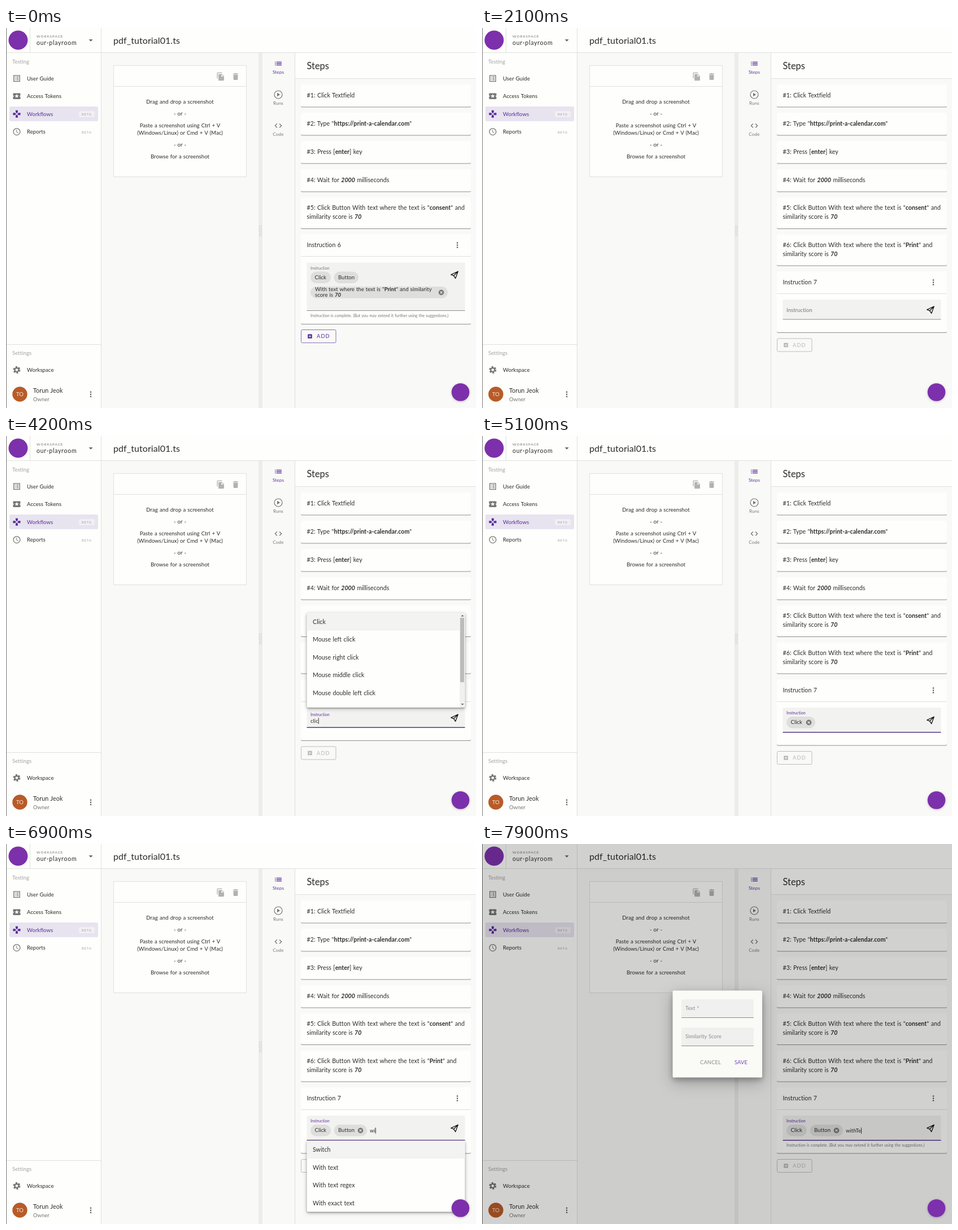
These frames come from a looping animation (832x673 px, 8 s). An HTML page:

```html
<!DOCTYPE html>
<html lang="en">
<head>
<meta charset="utf-8">
<title>Workflow steps</title>
<style>
  html, body { margin: 0; width: 832px; height: 673px; overflow: hidden; background: #f9f9f7; }
  svg { display: block; }
  text { font-family: Lato, "Open Sans", sans-serif; letter-spacing: .005em; word-spacing: .06em; }
  .b { font-weight: 700; }
  .bi { font-weight: 700; font-style: italic; }
  .card { fill: #fefefc; filter: drop-shadow(0 1px .6px rgba(0,0,0,.42)); }
  .popup { fill: #fefefc; filter: drop-shadow(0 1px .8px rgba(0,0,0,.35)) drop-shadow(0 2px 3px rgba(0,0,0,.25)); }
  .dialog { fill: #fafaf7; filter: drop-shadow(0 4px 5px rgba(0,0,0,.25)) drop-shadow(0 8px 13px rgba(0,0,0,.25)); }
</style>
</head>
<body>
<svg id="stage" width="832" height="673" viewBox="0 0 832 673"></svg>
<script>
const LOOP = 8000, INK = '#2b2b2b', GREY = '#757573', FAINT = '#a3a3a1', LINE = '#e0e0de',
  PURPLE = '#5b2d9c', BRAND = '#7c30ab', WHITE = '#fefefc', FIELD = '#f2f2f0';
const stage = document.getElementById('stage');

const text = (x, y, s, size = 10.6, fill = INK, attrs = '') =>
  `<text x="${x}" y="${y}" font-size="${size}" fill="${fill}" ${attrs}>${s}</text>`;
const spaced = n => `style="letter-spacing:${n}px"`;
const rect = (x, y, w, h, fill, attrs = '') =>
  `<rect x="${x}" y="${y}" width="${w}" height="${h}" fill="${fill}" ${attrs}/>`;
const box = (cls, x, y, w, h) => `<rect class="${cls}" x="${x}" y="${y}" width="${w}" height="${h}" rx="2"/>`;
const card = (y, h) => box('card', 522, y, 301, h - .6);
const circle = (x, y, r, fill, attrs = '') => `<circle cx="${x}" cy="${y}" r="${r}" fill="${fill}" ${attrs}/>`;
const stroke = (d, color, width = 1) => `<path d="${d}" fill="none" stroke="${color}" stroke-width="${width}"/>`;
const at = (x, y, body) => `<g transform="translate(${x} ${y})">${body}</g>`;
const bold = s => `<tspan class="b">${s}</tspan>`;
const strong = s => `<tspan class="bi">${s}</tspan>`;

// 24-unit icon centred on (x, y)
const icon = (d, x, y, fill, k = .656) =>
  `<path transform="translate(${x} ${y}) scale(${k}) translate(-12 -12)" d="${d}" fill="${fill}" fill-rule="evenodd"/>`;
const ICONS = {
  guide: 'M3 3h18v18H3zM5 5v14h14V5zM11 7h6v2h-6zm0 4h6v2h-6zm0 4h6v2h-6zM7 7h2v2H7zm0 4h2v2H7zm0 4h2v2H7z',
  ticket: 'M2 6q0-2 2-2h16q2 0 2 2v4a2 2 0 0 0 0 4v4q0 2-2 2H4q-2 0-2-2v-4a2 2 0 0 0 0-4zM12 5.8l-1.5 4-4.3.2 3.3 2.7-1.1 4.1 3.6-2.3 3.6 2.3-1.1-4.1 3.3-2.7-4.3-.2z',
  pads: 'M15 7.5V2H9v5.5l3 3zM7.5 9H2v6h5.5l3-3zM9 16.5V22h6v-5.5l-3-3zM16.5 9l-3 3 3 3H22V9z',
  copy: 'M16 1H4q-2 0-2 2v14h2V3h12zM15 5l6 6v10q0 2-2 2H8q-2 0-2-2V7q0-2 2-2zM14 12h5.5L14 6.5z',
  bin: 'M6 19q0 2 2 2h8q2 0 2-2V7H6zM19 4h-3.5l-1-1h-5l-1 1H5v2h14z',
  list: 'M3 7h2v2H3zm0 4h2v2H3zm0 4h2v2H3zM7 7h14v2H7zm0 4h14v2H7zm0 4h14v2H7z',
  code: 'M9.4 16.6L4.8 12l4.6-4.6L8 6l-6 6 6 6zM14.6 16.6l4.6-4.6-4.6-4.6L16 6l6 6-6 6z',
  add: 'M5 3h14q2 0 2 2v14q0 2-2 2H5q-2 0-2-2V5q0-2 2-2zM17 13v-2h-4V7h-2v4H7v2h4v4h2v-4z'
};
const kebab = (x, y) => [-4, 0, 4].map(d => circle(x, y + d, 1.3, '#5c5c5a')).join('');
const send = y => at(794, y, `<path d="M6.2 -6L-6.3 -.2L-1.5 1.7L1.6 6.4ZL-1.5 1.7" fill="none"
  stroke="#111" stroke-width="1.3" stroke-linejoin="round"/>`);

function sidebar() {
  const beta = y => text(143, y, 'BETA', 6, FAINT, `text-anchor="middle" ${spaced(.9)}`);
  return rect(0, 0, 168, 673, WHITE) + rect(6, 139, 157, 26, '#e7e3ef', 'rx="2"') +
    rect(129, 147, 28, 11, '#f1eff4', 'rx="2"') +
    text(11, 62.5, 'Testing', 9.6, FAINT) +
    text(37, 92.7, 'User Guide', 9.6) + text(37, 124.2, 'Access Tokens', 9.6) +
    text(37, 155.7, 'Workflows', 9.6, PURPLE) + text(37, 187, 'Reports', 9.6) + beta(155) + beta(186.5) +
    icon(ICONS.guide, 19, 89.3, GREY) + icon(ICONS.ticket, 19, 120.7, GREY) +
    icon(ICONS.pads, 19, 152.2, PURPLE) +
    at(19, 183.7, circle(0, 0, 5.9, 'none', `stroke="${GREY}" stroke-width="1.3"`) +
      stroke('M-.2 -3.4V.4L2.8 2.3', GREY)) +
    stroke('M0 560.5H168', LINE) + text(11, 578.7, 'Settings', 9.6, FAINT) +
    at(19, 605.5, circle(0, 0, 3.5, 'none', `stroke="${GREY}" stroke-width="2.3"`) +
      circle(0, 0, 5.3, 'none', `stroke="${GREY}" stroke-width="2.4" stroke-dasharray="3 ${5.3 * Math.PI / 3 - 3}"`)) +
    text(37, 608.9, 'Workspace', 9.6) +
    circle(24.5, 648.5, 13.2, '#b85b28') + text(24.5, 652, 'TO', 9.6, '#f6e6da', 'text-anchor="middle"') +
    text(48, 646.3, 'Torun Jeok', 10.8) + text(48, 660.5, 'Owner', 9.4, GREY) + kebab(150, 648.7);
}

function header() {
  return rect(0, 0, 832, 43, WHITE) + stroke('M0 43.5H832M42.5 0V43M168.5 0V673', LINE) +
    rect(0, 0, 1, 673, '#777775') + circle(21.5, 21.5, 17, BRAND) +
    text(54, 16.5, 'WORKSPACE', 6.3, GREY, spaced(1)) + text(54, 29.8, 'our-playroom', 10.6, INK, spaced(.7)) +
    '<path d="M146.6 20.2h7l-3.5 3.6z" fill="#5c5c5a"/>' + text(190, 27.5, 'pdf_tutorial01.ts', 16);
}

function middle() {
  const lines = [[134, 'Drag and drop a screenshot'], [155.3, '- or -'], [175.7, 'Paste a screenshot using Ctrl + V'],
    [188.9, '(Windows/Linux) or Cmd + V (Mac)'], [210.2, '- or -'], [231, 'Browse for a screenshot']];
  const tab = (y, s, fill) => text(482, y, s, 8, fill, `text-anchor="middle" ${spaced(.2)}`);
  let grip = '';
  for (let y = 350; y < 370; y += 2.5) grip += rect(448.5, y, 1, 1, '#b5b5b3') + rect(451, y, 1, 1, '#b5b5b3');
  return rect(190.5, 66.5, 235, 197, WHITE, `stroke="${LINE}"`) + stroke('M190 103.5H425', LINE) +
    icon(ICONS.copy, 380, 86, '#b2b2b0') + icon(ICONS.bin, 406.5, 86, '#b2b2b0') +
    lines.map(([y, s]) => text(308, y, s, 9.6, INK, 'text-anchor="middle"')).join('') +
    rect(447, 44, 7, 629, '#ececea') + grip + stroke('M511.5 44V673', LINE) +
    icon(ICONS.list, 482, 63, PURPLE) + tab(81.3, 'Steps', PURPLE) +
    circle(482, 118, 7, 'none', `stroke="${GREY}" stroke-width="1.2"`) +
    `<path d="M480 114.8l5 3.2l-5 3.2z" fill="${GREY}"/>` + tab(136.3, 'Runs', GREY) +
    icon(ICONS.code, 482, 173, GREY) + tab(191.3, 'Code', GREY);
}

const target = word => `With text where the text is "${bold(word)}" and`;
const score = `score is ${strong(70)}`;
const tallCard = (y, n, word) => card(y, 55.5) +
  text(532.5, y + 22, `#${n}: Click Button ${target(word)}`) + text(532.5, y + 38, `similarity ${score}`);

function steps() {
  const single = ['Click Textfield', `Type "${bold('https://print-a-calendar.com')}"`,
    `Press [${bold('enter')}] key`, `Wait for ${strong(2000)} milliseconds`];
  return rect(512, 44, 320, 45, WHITE) + stroke('M512 89.5H832', LINE) + text(532.5, 73, 'Steps', 16.3) +
    single.map((s, i) => card(100 + 50 * i, 40) +
      text(532.5, 122.7 + 50 * i, `#${i + 1}: ${s}`)).join('') + tallCard(300, 5, 'consent');
}

const close = (x, y) => circle(x, y, 4.8, '#777775') +
  stroke(`M${x - 1.9} ${y - 1.9}l3.8 3.8m0 -3.8l-3.8 3.8`, '#e8e8e6', 1.1);
const chip = (x, y, w, s, closable) => rect(x, y, w, 20.5, '#dededc', 'rx="10.25"') +
  text(x + 7.5, y + 13.4, s, 9.5) + (closable ? close(x + w - 11.5, y + 10.4) : '');
const helper = y => text(539, y, 'Instruction is complete. (But you may extend it further using the suggestions.)', 7, GREY);

function editor(n, top, height) {
  return card(top, height) + text(532.5, top + 22.5, `Instruction ${n}`) +
    kebab(799, top + 19.5) + stroke(`M522 ${top + 39.5}H823`, LINE);
}

function addButton(y, enabled) {
  const ink = enabled ? PURPLE : '#b9b9b7';
  return rect(522.5, y, 61.5, 23, 'none', `rx="2" stroke="${enabled ? '#8a74b4' : '#bdbdbb'}"`) +
    icon(ICONS.add, 538, y + 11.5, ink, .42) + text(550, y + 14.8, 'ADD', 9.3, ink, spaced(1.1));
}

function finishedEditor() {
  return editor(6, 365, 159.5) + rect(532.5, 415.5, 280, 85, FIELD, 'rx="2"') + stroke('M532.5 500.5H812.5', '#8c8c8a') +
    text(539, 428, 'Instruction', 7, GREY) + chip(539, 431.5, 36, 'Click') + chip(580.5, 431.5, 43.5, 'Button') +
    chip(539, 458, 243, '', true) +
    text(547, 466, `${target('Print')} similarity`, 9.5) + text(547, 476.4, score, 9.5) +
    send(437) + helper(512) + addButton(534.5, true);
}

const POOLS = [
  ['Click', 'Mouse left click', 'Mouse right click', 'Mouse middle click', 'Mouse double left click'],
  ['Button'],
  ['Switch', 'With text', 'With text regex', 'With exact text']
];

function popup(chips, typed) {
  const key = typed.toLowerCase();
  const options = POOLS[chips].filter(o => o.toLowerCase().replaceAll(' ', '').includes(key));
  const top = chips ? 525.5 : 313, height = chips ? options.length * 31.5 : 168;
  return box('popup', 532.5, top, 280, height) + rect(532.5, top, 280, 31.5, '#f3f3f1') +
    options.map((o, i) => text(543, top + 19.5 + 31.5 * i, o)).join('') +
    (chips ? '' : rect(803, 313, 9.5, 168, '#f0f0ee') + rect(804, 322, 7, 114, '#bcbcba') +
      '<path d="M805.5 319.5h5l-2.5 -2.8zM805.5 474h5l-2.5 2.8z" fill="#666"/>');
}

// time, finished chips, typed text
const typing = (chips, word, times) => times.map((t, i) => [t, chips, word.slice(0, i + 1)]);
const CUES = [
  [2500, 0, ''], ...typing(0, 'click', [3600, 3800, 4000, 4100, 4300]),
  [4500, 1, ''], ...typing(1, 'butt', [5300, 5500, 5700, 5900]),
  [6200, 2, ''], ...typing(2, 'withTe', [6700, 6900, 7100, 7300, 7500, 7700])
];
const ADDED = 1400, CHOSEN = 7800, DIALOG = 7900;

function newEditor(t, cue) {
  const [since, chips, typed] = cue || [0, 0, ''];
  const grow = chips ? 8.5 : 0, bottom = 516.5 + grow;
  let out = tallCard(365.5, 6, 'Print') + editor(7, 431, 108.5 + grow) +
    rect(532.5, 481, 280, 35.5 + grow, FIELD, 'rx="2"') + send(499 + grow / 2) + addButton(550 + grow, false);
  if (!cue) return out + stroke('M532.5 516H812.5', '#8c8c8a') + text(539, 502.5, 'Instruction', 9.5, GREY);
  const x = [539, 594.5, 644][chips], y = chips ? 510.6 : 507.5;
  out += rect(532.5, bottom - 1, 280, 1.4, '#4a2880') + text(539, chips ? 493.4 : 495.5, 'Instruction', 7, PURPLE) +
    text(x, y, typed, 9.5, INK, 'id="typed"');
  if (chips) out += chip(539, 497, chips > 1 ? 36 : 51, 'Click', chips < 2);
  if (chips > 1) out += chip(580.5, 497, 58.5, 'Button', true) + helper(536);
  if ((t - since) % 1000 < 500) out += rect(x, y - 8.5, .9, 11, INK, 'id="caret"');
  if (t < CHOSEN && (typed || !chips)) out += popup(chips, typed);
  return out;
}

function dialog() {
  const field = (y, s) => rect(353, y, 128, 32.5, '#f0f0ee', 'rx="2"') +
    stroke(`M353 ${y + 32.5}H481`, '#8c8c8a') + text(360, y + 18.8, s, 9.3, '#8b8b89');
  return rect(0, 0, 832, 673, '#000', 'opacity=".175"') +
    box('dialog', 337.5, 259.5, 158.5, 154) + field(275, 'Text *') + field(325, 'Similarity Score') +
    text(386, 390, 'CANCEL', 9.5, '#8b8b89') + text(447, 390, 'SAVE', 9.5, '#7348b4');
}

const backdrop = rect(0, 0, 832, 673, '#f9f9f7') + sidebar() + header() + middle() + steps();
const chat = circle(804.5, 645, 15.8, BRAND, 'style="filter:drop-shadow(0 1px 2px rgba(0,0,0,.2))"');
let shown = '';

function draw() {
  const t = performance.now() % LOOP;
  const cue = CUES.findLast(c => c[0] <= t);
  const scene = backdrop + (t < ADDED ? finishedEditor() : newEditor(t, cue)) + (t >= DIALOG ? dialog() : '') + chat;
  if (scene !== shown) {
    stage.innerHTML = shown = scene;
    const caret = document.getElementById('caret');
    if (caret) caret.setAttribute('x', +caret.getAttribute('x') + document.getElementById('typed').getComputedTextLength());
  }
  requestAnimationFrame(draw);
}
draw();
</script>
</body>
</html>
```
